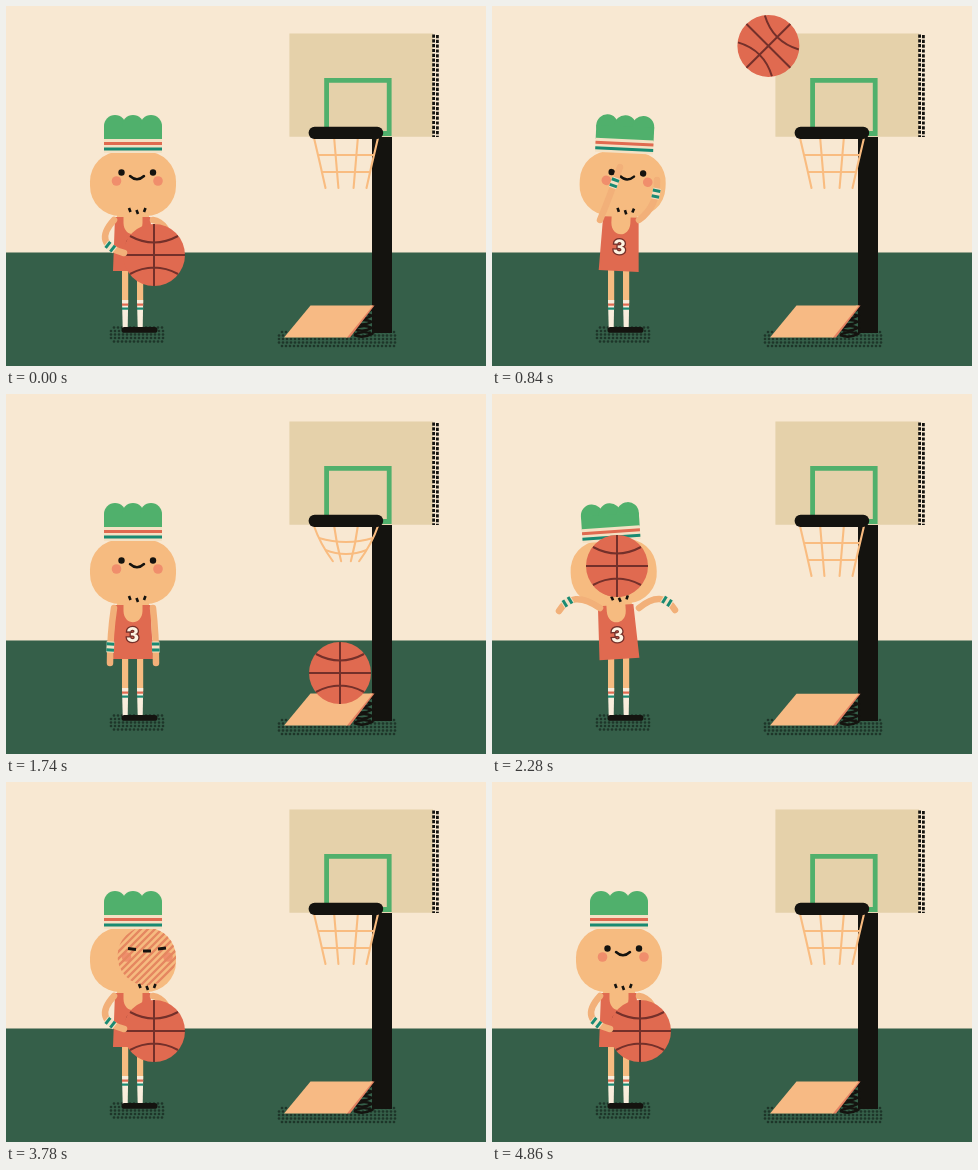
An HTML page with a canvas for the animation above (4.92 s loop, 480 by 360 pixels).

```html
<!DOCTYPE html>
<html lang="en">
<head>
<meta charset="utf-8">
<style>
html, body { margin: 0; width: 100%; height: 100%; overflow: hidden; background: #f8e8d2; }
canvas { display: block; width: 480px; height: 360px; }
</style>
</head>
<body>
<canvas id="stage" width="480" height="360"></canvas>
<script>
const ctx = document.getElementById('stage').getContext('2d');
const LOOP = 4920, STEP = 60;
const CREAM = '#f8e8d2', FIELD = '#355f49', BOARD = '#e5d1aa', GREEN = '#50b06c', BLACK = '#14130f', BAND = '#f4e1c4',
  SKIN = '#f6bb80', ARM = '#f2b079', RED = '#e06a50', SEAM = '#74302a', TEAL = '#198a72', NET = '#f9bc80';

// Moments of the story, in ms
const RELEASE = 540, RIM = 1080, DROP = 1560, LAND = 1740, LAUNCH = 1860, HIT = 2160, PEEL = 2720, CATCH = 2960;

const part = (t, from, to) => Math.min(1, Math.max(0, (t - from) / (to - from)));
const mix = (a, b, u) => a + (b - a) * u;
const bump = (t, from, to) => Math.sin(Math.PI * part(t, from, to));
function ease(t, from, to) {
  const u = part(t, from, to);
  return u * u * (3 - 2 * u);
}
const bezier = (a, b, c, u) => mix(mix(a, b, u), mix(b, c, u), u);

function ballAt(t) {
  if (t < RELEASE) {
    const lift = ease(t, 240, RELEASE);
    return [148 + 8 * lift, 249 + 5 * bump(t, 60, 360) - 137 * lift, 0];
  }
  if (t < RIM) {
    const u = part(t, RELEASE, RIM);
    return [156 + 184 * u * (1.4 - 0.4 * u), 112 - 292 * u * (1 - u), 81 * u];
  }
  const spin = 81 + 99 * ease(t, RIM, LAND);
  if (t < DROP) return [340, 172 - 58 * (1 - part(t, RIM, DROP)) ** 3, spin];
  if (t < LAUNCH) {
    const u = part(t, DROP, LAND);
    return [340 - 6 * u, 172 + 107 * u * u + 12 * ease(t, LAND, LAUNCH), spin];
  }
  if (t < PEEL) {
    const u = part(t, LAUNCH, HIT);
    return [bezier(334, 290, 125, u), bezier(291, 170, 172, u), 180 * u];
  }
  const u = part(t, PEEL, CATCH);
  return [125 + 23 * u + 4 * bump(t, CATCH, 3180), 172 + 77 * u * u + 4 * bump(t, CATCH, 3180), 0];
}

// Each pose: bend and hand of the left arm, then of the right arm.
const poses = {
  hip: [86, 238, 118, 247, 162, 216, 168, 245],
  shoot: [118, 190, 128, 161, 166, 200, 165, 174],
  down: [104, 240, 104, 269, 150, 240, 150, 269],
  flung: [80, 195, 67, 217, 170, 195, 183, 216]
};
const moves = [['shoot', 240, RELEASE], ['down', 1140, 1380], ['flung', 2040, HIT], ['hip', 2740, CATCH]];
function armsAt(t) {
  return moves.reduce((pose, [name, from, to]) => pose.map((v, i) => mix(v, poses[name][i], ease(t, from, to))), poses.hip);
}

const tiltAt = t => -2 * bump(t, 60, 420) + 2.6 * (ease(t, 420, 660) - ease(t, RIM, 1320))
  - 3.8 * ease(t, 2040, HIT) + 1.8 * ease(t, 2780, 3000) + 2 * ease(t, 3360, 3600);
const faceShiftAt = t => 10 * (ease(t, 3420, 3660) - ease(t, 4320, 4500))
  - 12.5 * (1 - Math.cos(4 * Math.PI * part(t, 3840, 4320)));
function netPull(t) {
  const since = t - DROP - STEP;
  return since < 0 ? ease(t, RIM, 1320) : Math.exp(-since / 300) * Math.cos(Math.PI * since / 120);
}
function rampDip(t) {
  const since = t - LAUNCH;
  return since < 0 ? 12 * ease(t, LAND, LAUNCH) : 12 * Math.exp(-since / 110) * Math.cos(Math.PI * since / 100);
}

function rect(x, y, w, h, color, r = 0) {
  ctx.fillStyle = color;
  ctx.beginPath();
  ctx.roundRect(x, y, w, h, r);
  ctx.fill();
}
function disc(x, y, r, color) {
  ctx.fillStyle = color;
  ctx.beginPath();
  ctx.arc(x, y, r, 0, 7);
  ctx.fill();
}
function fill(d, color) {
  ctx.fillStyle = color;
  ctx.fill(new Path2D(d));
}
function stroke(d, color, width, cap = 'butt') {
  ctx.strokeStyle = color;
  ctx.lineWidth = width;
  ctx.lineCap = cap;
  ctx.stroke(new Path2D(d));
}
function group(draw) {
  ctx.save();
  draw();
  ctx.restore();
}
function dots(x0, x1, y) {
  for (let row = 0; row < 5; row++) {
    const inset = Math.abs(row - 2) > 1 ? 3 : 0;
    for (let x = x0 + inset; x <= x1 - inset; x += 4) disc(x, y + row * 3.5, 1.3, '#1e3529');
  }
}

function court(dip) {
  rect(0, 0, 480, 360, CREAM);
  rect(0, 246.6, 480, 114, FIELD);
  dots(105, 160, 321.5);
  dots(273, 392, 326);
  rect(283.4, 27.4, 143.6, 103.4, BOARD);
  ctx.setLineDash([3.2, 1.6]);
  stroke('M427.6 28.500V131M431.4 29V131', BLACK, 2.8);
  ctx.setLineDash([]);
  stroke('M320.6 74.300H383.200V127.500H320.600Z', GREEN, 4.8);
  rect(366, 131, 20, 196, BLACK);
  const top = 299.6 + dip, gap = (330 - top) / 5;
  for (let i = 0; i < 5; i++) {
    const y = top + 4 + i * gap;
    stroke(`M348 ${y + 1}Q357 ${y - 4} 366 ${y}Q357 ${y + 5} 348 ${y + 1}`, BLACK, 2.4);
  }
  fill(`M364 ${top}H368.500L344 331.500H340Z`, '#e48262');
  fill(`M304.500 ${top}H367L341 331.500H278Z`, '#f7ba84');
}

function hoop(pull) {
  const bottom = 182 + 22 * pull, low = 20.5 + 11 * pull, bend = 26 + 8 * Math.max(pull, 0), sag = 12 * Math.abs(pull);
  for (const side of [-1, -0.37, 0.37, 1]) {
    stroke(`M${340 + side * 32} 132Q${340 + side * bend} ${(132 + bottom) / 2} ${340 + side * low} ${bottom}`, NET, 2.1, 'round');
  }
  for (const f of [0.34, 0.68]) {
    const half = bezier(32, bend, low, f), y = mix(132, bottom, f);
    stroke(`M${340 - half} ${y}Q340 ${y + sag} ${340 + half} ${y}`, NET, 2.1);
  }
  rect(302.6, 120.8, 74.6, 12.2, BLACK, 6);
}

function ball([x, y, angle]) {
  group(() => {
    ctx.translate(x, y);
    ctx.rotate(angle * Math.PI / 180);
    disc(0, 0, 31, RED);
    stroke('M-31 0H31M0 -31V31M-24 -19Q0 -6 24 -19M-24 19Q0 6 24 19', SEAM, 2);
  });
}

function arm(shoulder, bx, by, hx, hy) {
  const y = 214, u = 0.72;
  stroke(`M${shoulder} ${y}Q${bx} ${by} ${hx} ${hy}`, ARM, 6.5, 'round');
  group(() => {
    ctx.translate(bezier(shoulder, bx, hx, u), bezier(y, by, hy, u));
    ctx.rotate(Math.atan2(mix(by - y, hy - by, u), mix(bx - shoulder, hx - bx, u)));
    rect(-5.5, -3.8, 11, 7.6, BAND);
    rect(-4.5, -3.8, 3, 7.6, TEAL);
    rect(1.5, -3.8, 3, 7.6, TEAL);
  });
}

function legs() {
  for (const x of [116, 131]) {
    rect(x, 255, 6.2, 42, SKIN);
    fill(`M${x} 294h6.200l-.5 28h-5Z`, '#f9eddc');
    rect(x, 297.5, 6.2, 2.2, RED);
    rect(x, 301.5, 6.2, 2.2, TEAL);
  }
  rect(115.5, 321, 36, 5.8, BLACK, 3);
}

function torso() {
  rect(111, 206, 32, 40, SKIN);
  fill('M107 265L109 211H117.500V217C118 232 136 232 136.500 217V211H144.500L147 265Z', RED);
  ctx.font = '800 20px Inter, "Open Sans", sans-serif';
  ctx.textAlign = 'center';
  ctx.lineWidth = 2.6;
  ctx.strokeStyle = SEAM;
  ctx.strokeText('3', 126.5, 248);
  ctx.fillStyle = '#fdf3e2';
  ctx.fillText('3', 126.5, 248);
}

function face(shift, mark, dazed) {
  ctx.translate(shift, 0);
  for (const x of [110.5, 152]) disc(x, 175, 4.8, '#f08e6c');
  if (mark > 0) group(() => {
    ctx.globalAlpha = mark;
    ctx.beginPath();
    ctx.arc(131, 174, 29.5, 0, 7);
    ctx.clip();
    for (let x = 70; x < 195; x += 7) stroke(`M${x - 32} 206L${x + 32} 142`, '#e58760', 2.3);
  });
  if (dazed) return stroke('M112 166.500l8 1M127 169h8M142 167l8 -1', BLACK, 2.8);
  for (const x of [115.5, 147]) disc(x, 166.5, 3.2, BLACK);
  stroke('M124 170Q131 176.500 138 170', BLACK, 2.5, 'round');
}

function head(shift, mark, stretch, dazed) {
  rect(84, 145.5, 86, 64.5, SKIN, 30);
  group(() => {
    ctx.beginPath();
    ctx.roundRect(84, 145.5, 86, 64.5, 30);
    ctx.clip();
    face(shift, mark, dazed);
  });
  stroke(`M${123 + shift} 202l1.500 4M${130.5 + shift} 204l1.500 4M${139.5 + shift} 202l-1.500 4`, BLACK, 2.6);
  const top = 120 - stretch;
  for (const x of [109, 127, 145]) disc(x, top, 11, GREEN);
  rect(98, top, 58, 134 - top, GREEN);
  rect(98, 133, 58, 14, BAND);
  rect(98, 136, 58, 3, RED);
  rect(98, 141.5, 58, 3, TEAL);
}

function draw(t) {
  const crouch = 5 * bump(t, 60, 420), arms = armsAt(t);
  const mark = ease(t, 2100, HIT) - ease(t, 4140, 4440);
  court(rampDip(t));
  legs();
  group(() => {
    ctx.translate(127, 258 + crouch);
    ctx.rotate(tiltAt(t) * Math.PI / 180);
    ctx.translate(-127, -258);
    torso();
    head(faceShiftAt(t), mark, 10 * bump(t, 2100, 2220), t >= HIT && t < 4440);
  });
  arm(147, ...arms.slice(4));
  ball(ballAt(t));
  arm(108, ...arms.slice(0, 4));
  hoop(netPull(t));
}

const start = performance.now();
ctx.lineJoin = 'miter';
function tick() {
  const t = (performance.now() - start) % LOOP;
  draw(Math.floor(t / STEP) * STEP);
  requestAnimationFrame(tick);
}
tick();
</script>
</body>
</html>
```
